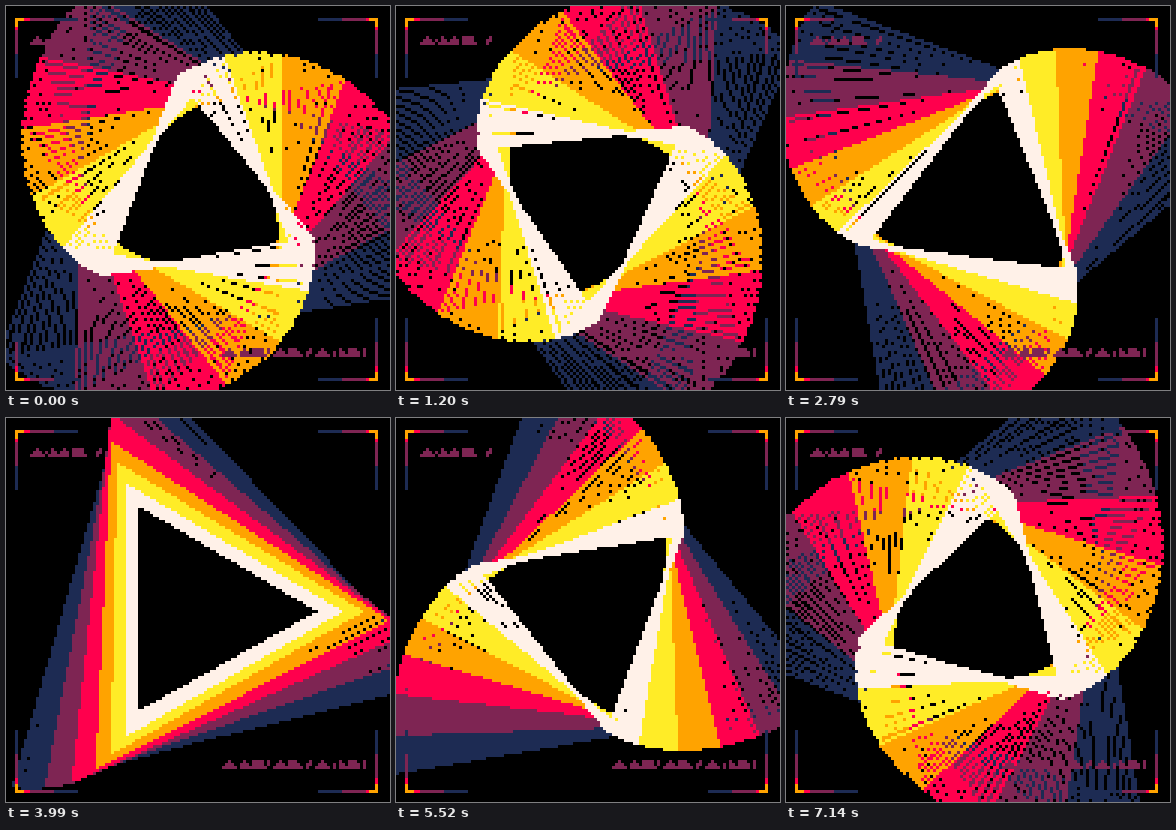
An HTML page with a canvas that plays this animation: 384x384 px, repeating every 7170 ms.

```html
<!DOCTYPE html>
<html lang="en">
<head>
<meta charset="utf-8">
<title>Twisting triangles</title>
<style>
  html, body { margin: 0; width: 100%; height: 100%; overflow: hidden; background: #000; }
  canvas { display: block; width: 100%; height: 100%; image-rendering: pixelated; }
</style>
</head>
<body>
<canvas id="stage" width="128" height="128"></canvas>
<script>
const SIZE = 128, LOOP = 7170, STEP = 30;
const WHITE = '#fff1e8', YELLOW = '#ffec27', ORANGE = '#ffa300',
      RED = '#ff004d', PURPLE = '#7e2553', BLUE = '#1d2b53';
const BANDS = [WHITE, YELLOW, ORANGE, RED, PURPLE, BLUE];
const PER_BAND = 15, COUNT = PER_BAND * BANDS.length;

const ctx = document.getElementById('stage').getContext('2d');

// Pixel line with whole-number ends, one cell per step on the long axis
function line(x0, y0, x1, y1) {
  const dx = x1 - x0, dy = y1 - y0;
  const n = Math.max(Math.abs(dx), Math.abs(dy));
  for (let i = 0; i <= n; i++) {
    const k = n ? i / n : 0;
    const x = Math.floor(x0 + dx * k + 0.5), y = Math.floor(y0 + dy * k + 0.5);
    if (x >= 0 && y >= 0 && x < SIZE && y < SIZE) ctx.fillRect(x, y, 1, 1);
  }
}

// One full turn of swing every 15 s; outer triangles lag behind
function turn(i, t) {
  const lag = 3.8745 + i * 0.0093;
  return 2 * Math.PI * (1 - Math.cos((t - lag) * 2 * Math.PI / 15));
}

function triangle(i, t) {
  const r = 40 + i / 2, a = turn(i, t), pts = [];
  for (let k = 0; k < 3; k++) {
    const b = a + k * 2 * Math.PI / 3;
    pts.push([Math.floor(64 + r * Math.cos(b)), Math.floor(64 + r * Math.sin(b))]);
  }
  pts.forEach((p, k) => line(...p, ...pts[(k + 1) % 3]));
}

function corners() {
  const left = 3, right = 124, top = 4, bottom = 125, tip = 3;
  const arms = (color, x0, x1, y0, y1) => {
    ctx.fillStyle = color;
    for (const y of [top, bottom - 1]) {
      ctx.fillRect(left, y, x0 - left, 1);
      ctx.fillRect(x1, y, right - x1, 1);
    }
    for (const x of [left, right - 1]) {
      ctx.fillRect(x, top, 1, y0 - top);
      ctx.fillRect(x, y1, 1, bottom - y1);
    }
  };
  for (const [color, end] of [[BLUE, 24], [PURPLE, 16], [RED, 8]]) {
    arms(color, end, SIZE - end, end, SIZE - end);
  }
  arms(ORANGE, left + tip, right - tip, top + tip, bottom - tip);
}

// Tiny lettering, three cells high
const HEAD = [
  '..#....#...#..####.....#',
  '.###.#.##.###.####....##',
  '#####.#######.#####...#.'
];
const FOOT = [
  '..#....#..####.#...#..###....#...#.....#..###..#',
  '.###..###.####.#..###.####..##..###..#.##.####.#',
  '#####.#########..##########.#..#####.#.#######.#'
];

function label(rows, x, y) {
  ctx.fillStyle = PURPLE;
  rows.forEach((row, j) => [...row].forEach((c, i) => {
    if (c === '#') ctx.fillRect(x + i, y + j, 1, 1);
  }));
}

function draw(t) {
  ctx.fillStyle = '#000';
  ctx.fillRect(0, 0, SIZE, SIZE);
  for (let i = COUNT; i > 0; i--) {
    ctx.fillStyle = BANDS[Math.floor((i - 1) / PER_BAND)];
    triangle(i, t);
  }
  corners();
  label(HEAD, 8, 10);
  label(FOOT, 72, 114);
}

const start = performance.now();
let last = -1;
function tick() {
  const ms = Math.max(0, performance.now() - start) % LOOP;
  const step = Math.floor(ms / STEP);
  if (step !== last) draw((last = step) * STEP / 1000);
  requestAnimationFrame(tick);
}
tick();
</script>
</body>
</html>
```
